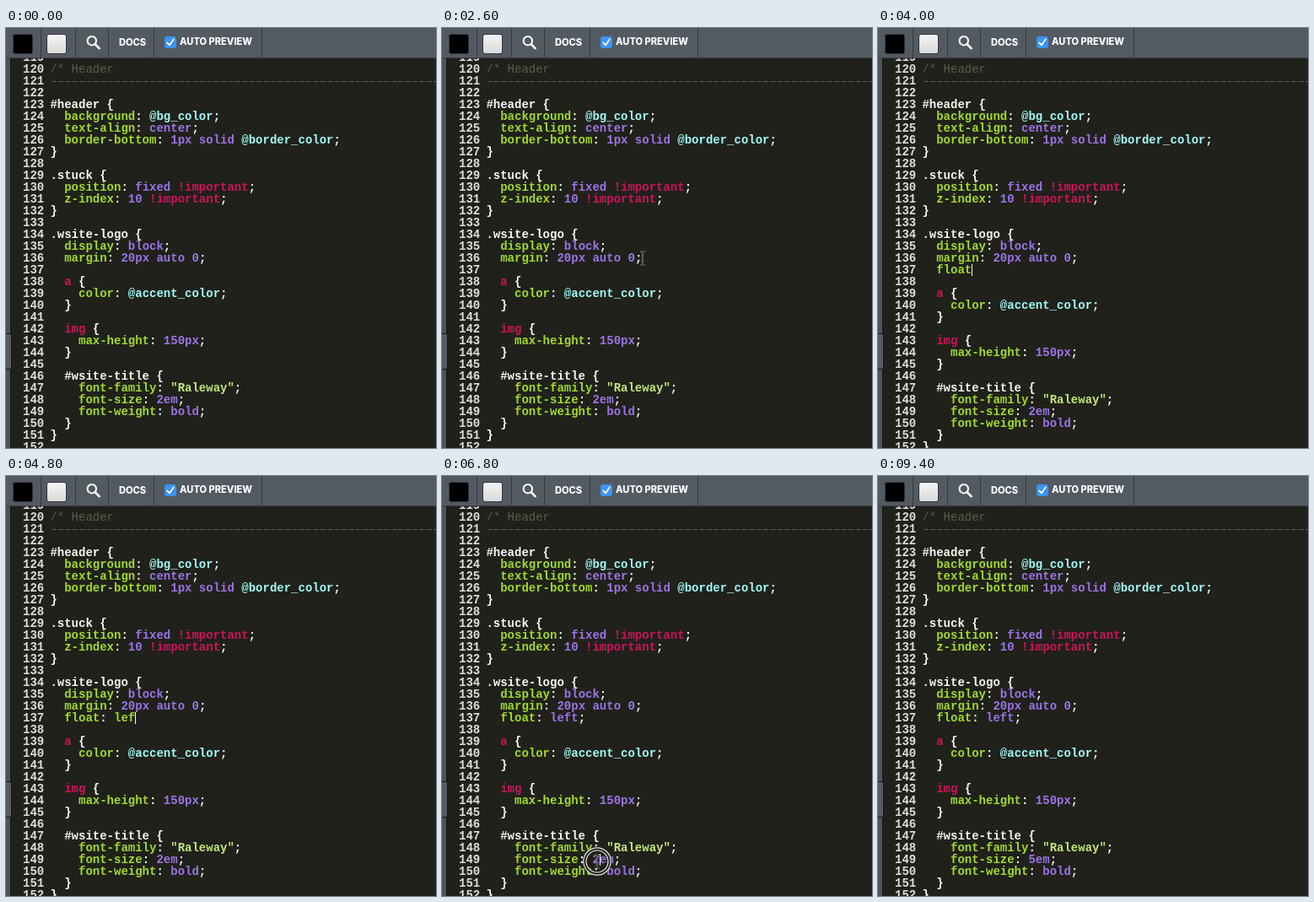
Recreate the animation shown at these times as an HTML page. Size 510 by 498 pixels, loop 9.6 s.

```html
<!DOCTYPE html>
<html lang="en">
<head>
<meta charset="utf-8">
<title>Stylesheet editor</title>
<style>
html, body { margin: 0; width: 100%; height: 100%; overflow: hidden; background: #20211a; }
#stage { position: relative; width: 510px; height: 498px; overflow: hidden; background: #20211a; }
#stage > * { position: absolute; }
pre {
  margin: 0; top: 28px; color: #f8f8f2;
  font: bold 14px/14px "Liberation Mono", "Courier New", monospace;
}
#nums { left: 20px; color: #deded8; }
#code { left: 52.4px; }
.c { color: #5b5b52; font-weight: normal; }
.s { color: #c3e67c; }
.v { color: #a0fbf8; }
.k { color: #cc135b; }
.n { color: #9c74e6; }
.p { color: #a0da2c; }
#rail { left: 0; top: 36px; width: 5px; height: 462px; background: #4d545b; border-right: 1px solid #111; }
#grip { left: 0; top: 362px; width: 6px; height: 41px; background: #555c63; border: solid #15161a; border-width: 1px 1px 1px 0; }
#bar { left: 0; top: 0; width: 510px; height: 35px; background: #535a62; border-bottom: 1px solid #383d42; }
#bar > * { position: absolute; }
#bar i { top: 0; width: 1px; height: 35px; background: #343a40; }
#bar span { color: #fff; font: 800 11.1px/14px Inter, sans-serif; white-space: nowrap; top: 10px; }
.swatch { top: 7px; width: 22px; height: 22px; border: 1px solid #33383d; border-radius: 3px; }
#overlay { left: 0; top: 0; }
</style>
</head>
<body>
<div id="stage">
  <pre id="nums"></pre>
  <pre id="code"></pre>
  <div id="rail"></div>
  <div id="grip"></div>
  <div id="bar">
    <i style="left:41px"></i><i style="left:82px"></i><i style="left:121px"></i><i style="left:175px"></i><i style="left:303px"></i>
    <b class="swatch" style="left:8px;background:#000"></b>
    <b class="swatch" style="left:48px;background:linear-gradient(#f4f4f4,#d9d9d9)"></b>
    <svg width="304" height="35" fill="none" stroke="#fff">
      <circle cx="101.8" cy="15.2" r="5.2" stroke-width="2"/>
      <path d="M105.6 19l5 5.2" stroke-width="2.6" stroke-linecap="round"/>
      <rect x="188" y="10" width="14" height="14" rx="3" fill="#3a94f7" stroke="none"/>
      <path d="M191.2 17.4l2.7 3 4.9-7.2" stroke-width="1.8" stroke-linecap="round" stroke-linejoin="round"/>
    </svg>
    <span style="left:134px">DOCS</span>
    <span style="left:206px;top:9px">AUTO PREVIEW</span>
  </div>
  <svg id="overlay" width="510" height="498">
    <defs>
      <path id="ibeam" d="M-3-8Q0-8 0-6V6Q0 8-3 8M3-8Q0-8 0-6M0 6Q0 8 3 8M-2 3H2"/>
    </defs>
    <rect id="caret" width="1" height="14" fill="#f8f8f0"/>
    <g id="ring" fill="none">
      <circle r="14.5" stroke="#20211a" stroke-width="4"/>
      <circle r="16.2" stroke="#e4e4e4" stroke-width="1.2"/>
      <circle r="13" stroke="#e4e4e4" stroke-width="1.2"/>
    </g>
    <path id="arrow" d="M.5 0V15L3.8 12L6.1 17.2L8.3 16.2L6.1 11.2H10.6Z" fill="#111" stroke="#fff" stroke-width=".9" stroke-linejoin="round"/>
    <g id="beam" fill="none">
      <use href="#ibeam" stroke="#92928c" stroke-width="1.6"/>
      <use href="#ibeam" stroke="#111" stroke-width=".7"/>
    </g>
  </svg>
</div>
<script>
const LOOP = 9600, TICK = 200, FIRST = 119, ROWS = 34, CHAR = 8.4, LINE = 14;
const $ = id => document.getElementById(id);

const source = `
/* Header
${'–'.repeat(56)}

#header {
  background: @bg_color;
  text-align: center;
  border-bottom: 1px solid @border_color;
}

.stuck {
  position: fixed !important;
  z-index: 10 !important;
}

.wsite-logo {
  display: block;
  margin: 20px auto 0;

  a {
    color: @accent_color;
  }

  img {
    max-height: 150px;
  }

  #wsite-title {
    font-family: "Raleway";
    font-size: 2em;
    font-weight: bold;
  }
}
`.split('\n');

const token = /(\/\*.*|–+)|("[^"]*")|(@\w+)|(!\w+|\b(?:a|img)(?= \{))|([#.][\w-]+)|((?:\d\w*|solid|center|fixed|block|auto|bold|left)\b)|([\w-]+)/g;
const kinds = ['c', 's', 'v', 'k', '', 'n', 'p'];
const paint = line => line.replace(token, (text, ...groups) => {
  const kind = kinds[groups.slice(0, 7).findIndex(g => g !== undefined)];
  return kind ? `<span class="${kind}">${text}</span>` : text;
});

// Pointer moves: start, end, from, to
const moves = [
  [1400, 2200, [382, 397], [238, 273]],
  [2200, 2800, [238, 273], [238, 273]],
  [5400, 6400, [254, 342], [184, 457]],
  [6400, 7200, [184, 457], [184, 457]]
];
const ease = u => u * u * (3 - 2 * u);

function pointer(t) {
  const move = moves.find(m => t >= m[0] && t < m[1]);
  if (!move) return null;
  const [start, end, from, to] = move;
  const u = ease((t - start) / (end - start));
  return from.map((a, i) => a + (to[i] - a) * u);
}

function caretAt(t, typed) {
  if (t >= 2600 && t < 3000) return [136, 22];
  if (t >= 3000 && t < 6600) return (t < 5600 || t % 1000 < 500) && [137, 2 + typed.length];
  if (t >= 6600 && t < 7200) return [149, 16];
  if (t >= 7200 && t < 7600) return [149, 15];
  if (t >= 7600) return (t - 7600) % 1000 < 600 && t < 9200 && [149, 16];
  return null;
}

function place(id, point) {
  $(id).style.display = point ? '' : 'none';
  if (point) $(id).setAttribute('transform', `translate(${point[0]} ${point[1]})`);
}

function draw(t) {
  const lines = source.slice();
  const count = t <= 4800 ? Math.round((t - 3200) / 160) : 10 + (t - 4800) / TICK;
  const typed = 'float: left;'.slice(0, Math.max(0, count));
  const size = t < 7200 ? '2' : t < 7600 ? '' : '5';
  if (t >= 3000) lines.splice(137 - FIRST, 0, '  ' + typed);
  $('code').innerHTML = lines.slice(0, ROWS)
    .map(line => paint(line.replace('2em', size + 'em'))).join('\n');

  const caret = caretAt(t, typed);
  place('caret', caret && [Math.round(52.4 + caret[1] * CHAR), 28 + (caret[0] - FIRST) * LINE]);

  const mouse = pointer(t);
  place('arrow', t < 1600 && mouse);
  place('beam', t >= 1600 && mouse);
  place('ring', (t === 2400 || t === 6600 || t === 6800) && mouse);
}

$('nums').textContent = Array.from({ length: ROWS }, (_, i) => FIRST + i).join('\n');

let last = -1;
function frame() {
  const t = Math.floor(performance.now() % LOOP / TICK) * TICK;
  if (t !== last) draw(last = t);
  requestAnimationFrame(frame);
}
frame();
</script>
</body>
</html>
```
